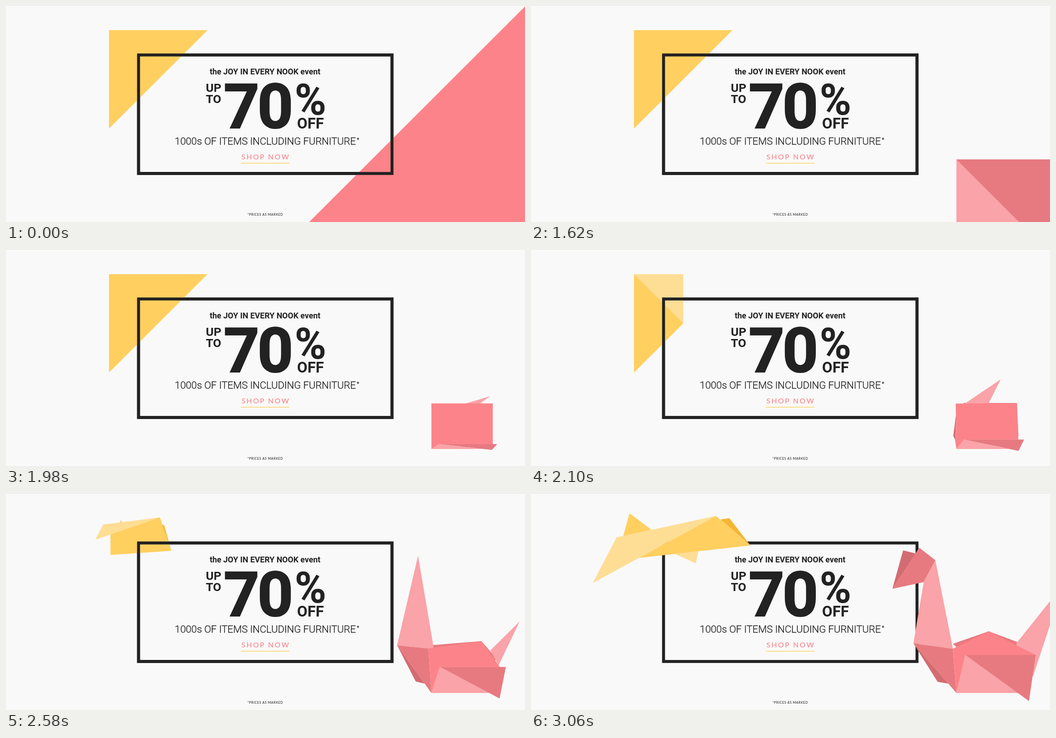
An HTML page that plays this animation: 1159 by 483 pixels, repeating every 6060 ms.

```html
<!DOCTYPE html>
<html lang="en">
<head>
<meta charset="utf-8">
<title>Paper fold sale</title>
<style>
  html, body { margin: 0; height: 100%; overflow: hidden; background: #f9f9f9; }
  svg { display: block; width: 100vw; height: 100vh; }
  text { fill: #222; font-family: Roboto, sans-serif; font-weight: 700; text-anchor: middle; }
  .frame { fill: none; stroke: #222; stroke-width: 6.6; }
  .big { font-size: 140px; stroke: #222; stroke-width: 2; }
  .thin { font-weight: 300; font-size: 22.5px; letter-spacing: -.15px; stroke: #222; stroke-width: .3; }
  .lato { font-family: Lato, sans-serif; font-weight: 500; }
  .shop { fill: #fc8389; font-size: 16px; letter-spacing: 2.5px; }
  .note { font-size: 7px; letter-spacing: .7px; }
</style>
</head>
<body>
<svg viewBox="0 0 1159 483">
  <rect width="1159" height="1" fill="#fff"/>
  <rect class="frame" x="296" y="109.5" width="566" height="265"/>
  <g id="paper"></g>
  <rect class="frame" id="front" x="296" y="109.5" width="566" height="265"/>
  <text x="578.5" y="153" font-size="18">the JOY IN EVERY NOOK event</text>
  <text x="463.5" y="192" font-size="26.5">UP</text>
  <text x="463.5" y="217" font-size="26.5">TO</text>
  <text class="big" x="526" y="273">7</text>
  <text class="big" x="601.5" y="273">0</text>
  <text x="680" y="243" font-size="96">%</text>
  <text x="680" y="274" font-size="33.5">OFF</text>
  <text class="thin" x="579" y="310">1000s OF ITEMS INCLUDING FURNITURE</text>
  <text x="786" y="303" font-size="12" font-weight="400">*</text>
  <text class="lato shop" x="580" y="343">SHOP NOW</text>
  <path d="M524 351.5H633" stroke="#ffcf60" stroke-width="1.5"/>
  <text class="lato note" x="579" y="469">*PRICES AS MARKED</text>
</svg>
<script>
const PINK = '#fc8389', ROSE = '#faa3a8', DUSK = '#e77a80', DEEP = '#d36c72';
const GOLD = '#ffcf60', PALE = '#fedd95', AMBER = '#f5b731';
const START = 1500, STEP = 120, LAST = 14, LOOP = 6060;
const paper = document.getElementById('paper');
const front = document.getElementById('front');

const face = (color, ...points) => `<polygon fill="${color}" points="${points.join(' ')}"/>`;
const box = (color, l, t, r, b) => face(color, [l, t], [r, t], [r, b], [l, b]);
const mix = (a, b, f) => a + (b - a) * f;
const mover = f => (x, y, toX, toY) => [mix(x, toX, f), mix(y, toY, f)];
const progress = (s, from, to) => Math.min(1, Math.max(0, (s - from) / (to - from)));

function yellowFolds(s) {
  const x = 230, y = 54, half = 110, size = 2 * half;
  const mid = [x + half, y + half];
  if (s < 6) return face(GOLD, [x, y], [x + size, y], [x, y + size]);
  if (s > 6) return box(GOLD, x, y, ...mid);
  return face(GOLD, [x, y], [x + half, y], mid, [x, y + size])
    + face(PALE, [x, y], [x + half, y], mid);
}

function yellowBird(s) {
  const move = mover(progress(s, 8, LAST));
  const crest = move(309, 54, 413, 49);
  const tail = move(309, 133, 490, 115);
  return face(AMBER, move(309, 70, 423, 57), move(309, 80, 443, 54), tail)
    + face(GOLD, move(276, 64, 220, 43), move(255, 60, 269, 80), move(270, 70, 206, 94))
    + face(PALE, move(300, 120, 321, 134), move(300, 120, 374, 128), move(300, 112, 368, 155))
    + face(GOLD, crest, tail, move(230, 133, 240, 143), move(230, 54, 240, 143))
    + face(PALE, move(230, 54, 138, 199), move(230, 54, 191, 97), crest);
}

function pinkFolds(s) {
  const l = 950, t = 343, r = 1159, b = 483, w = r - l;
  if (s === 0) return face(PINK, [r, 1], [r, b], [r - 482, b]);
  if (s === 1) return box(ROSE, l, 210, r, b) + face(PINK, [l, 0], [r, 0], [r, 210 + w], [l, 210])
    + face('#f9f9f9', [l, 0], [r, 1], [l, 210]);
  if (s === 2) return box(ROSE, l, t, r, b) + face(DUSK, [l, t], [r, t], [r, b], [l + b - t, b]);
  return box(PINK, l, t, 1087, s === 3 ? b : 445);
}

// Wing, neck, back and head each open on their own clock.
function pinkBird(s) {
  const u = progress(s, 5, LAST), reach = progress(s, 5, 11), nod = progress(s, 11, LAST);
  const open = mover(1 - (1 - u) ** 1.26);
  const stretch = mover(reach);
  const lift = mover(u ** 1.6);

  const keel = [950, 445];
  const fold = open(967, 434, 970, 360);
  const wingTip = open(1085, 447, 1112, 463);
  const top = lift(1087, 343, 1022, 307);
  const hip = [lift(1087, 0, 1127, 0)[0], fold[1]];
  const chest = stretch(950, 343, 942, 346);
  const nape = stretch(1025, 368, 942, 345);
  const throat = stretch(970, 360, 854, 334);
  const belly = stretch(950, 424, 932, 424);
  const peak = stretch(1081, 327, 888, 100);

  const bend = (x, y) => mover(nod)(...peak, x, y);
  const beak = bend(807, 212), jaw = bend(877, 197), crown = bend(903, 148);

  return face(DUSK, open(970, 343, 942, 335), top, open(1086, 430, 1105, 338), fold)
    + face(ROSE, open(1080, 375, 1083, 335), open(1073, 432, 1189, 202), open(1062, 340, 1121, 408))
    + face(DEEP, bend(831, 126), bend(859, 133), beak)
    + face(DUSK, bend(867, 120), crown, jaw, beak)
    + face(ROSE, throat, jaw, crown, nape, chest)
    + face(DEEP, throat, belly, stretch(950, 415, 908, 420))
    + face(DUSK, throat, chest, keel, belly)
    + face(PINK, chest, top, hip, fold, keel)
    + face(ROSE, fold, [wingTip[0] - 22, 445], keel)
    + face(DUSK, fold, open(1097, 434, 1127, 360), wingTip);
}

function draw(now) {
  const t = now % LOOP;
  const s = t < START ? 0 : Math.min(LAST, Math.floor((t - START) / STEP) + 1);
  paper.innerHTML = (s < 8 ? yellowFolds(s) : yellowBird(s))
    + (s < 5 ? pinkFolds(s) : pinkBird(s));
  front.style.display = s < 11 ? '' : 'none';
}

const begin = performance.now();
function tick() {
  draw(performance.now() - begin);
  requestAnimationFrame(tick);
}
tick();
</script>
</body>
</html>
```
